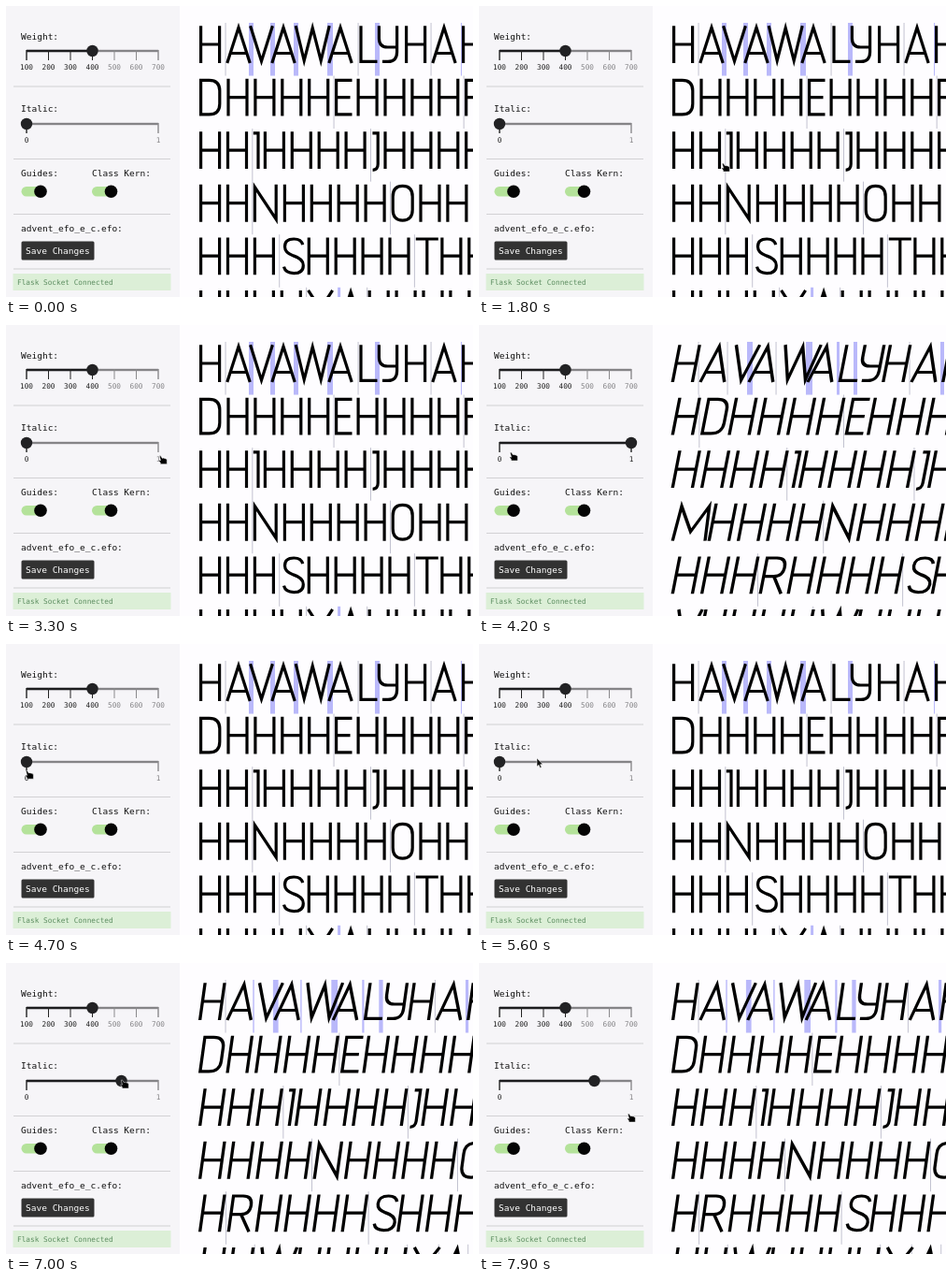
Animation, 500 px wide and 311 px high, one loop 8 s. Source, as an HTML page:

```html
<!DOCTYPE html>
<html lang="en">
<head>
<meta charset="utf-8">
<title>Kerning preview</title>
<style>
  html, body { margin: 0; width: 100%; height: 100%; overflow: hidden; background: #fefdff; }
  svg { display: block; width: 500px; height: 311px; }
  text { font: 9.53px "DejaVu Sans Mono", monospace; fill: #111; white-space: pre; }
  text.small { font-size: 7.75px; }
  .mid { text-anchor: middle; }
  .glyph { fill: none; stroke: #000; stroke-width: 3.2; stroke-miterlimit: 8; }
</style>
</head>
<body>
<svg id="stage" viewBox="0 0 500 311">
  <g id="guides"></g>
  <g id="glyphs"></g>
  <rect width="186" height="311" fill="#f6f5f8"/>
  <g id="panel"></g>
  <g id="cursor">
    <path id="hand" d="M-3.6 -4.6 Q-3 -5.6 -2 -4.4 L-.6 -2.2 Q.4 -3 1.4 -2.1 Q2.4 -2.6 3 -1.6 Q4.4 -1.8 4.4 -.2 V4 H-2.6 V2.6 L-4.2 .6 Q-4 -.4 -2.4 .2 Z" fill="#000" stroke="#fff" stroke-width=".5"/>
    <path id="arrow" d="M0 -4.5 V4.6 L2 2.8 L3.5 6 L5 5.3 L3.6 2.3 L6.2 2 Z" fill="#111" stroke="#fff" stroke-width=".5"/>
  </g>
</svg>
<script>
const LOOP = 8000, PITCH = 56.55, BASE = 61;
const $ = id => document.getElementById(id);

function add(parent, tag, attrs, text) {
  const el = document.createElementNS("http://www.w3.org/2000/svg", tag);
  for (const k in attrs) el.setAttribute(k, attrs[k]);
  if (text) el.textContent = text;
  parent.appendChild(el);
  return el;
}

// letter: [advance, outline on a baseline at 0]
const FONT = {
  H: [28.9, "M2.6 0V-39.8M22.6 0V-39.8M2.6 -20H22.6"],
  A: [31.5, "M1.8 0L14 -38L26.2 0M5.6 -10.5H22.4"],
  V: [28, "M1.6 -39.8L13.5 -2L25.4 -39.8"],
  W: [41, "M2.2 -39.8L11.2 -2.5L20.2 -37.5L29.2 -2.5L38.2 -39.8"],
  L: [24, "M3 -39.8V-1.6H20.5"],
  Y: [31, "M4.4 -39.8V-26.5Q4.4 -17 13.5 -17H23.6M23.6 -39.8V-12Q23.6 -1.6 14 -1.6H8"],
  D: [29.4, "M2.6 -1.6H11.5Q22.8 -1.6 22.8 -13V-27Q22.8 -38.2 11.5 -38.2H2.6Z"],
  E: [23.5, "M19.5 -1.6H2.6V-38.2H19.5M2.6 -20H17.5"],
  F: [23, "M2.6 0V-38.2H19.5M2.6 -20H17.5"],
  I: [11, "M1 -38.2H6.2V0"],
  J: [13, "M2 -38.2H7.8V-5Q7.8 1 2.2 1.2"],
  M: [39, "M2.6 0L5 -37L19 -10L33 -37L35.4 0"],
  N: [32, "M2.6 0V-37L25.4 -2.8V-39.8"],
  O: [30, "M2.8 -13V-27Q2.8 -38.2 13.2 -38.2Q23.8 -38.2 23.8 -27V-13Q23.8 -1.6 13.2 -1.6Q2.8 -1.6 2.8 -13Z"],
  R: [30, "M2.6 0V-38.2H12.5Q22 -38.2 22 -28.5Q22 -18.5 12.5 -18.5H2.6M13 -18.5L23.5 0"],
  S: [29, "M25 -32Q23.5 -38.2 15.5 -38.2Q5.8 -38.2 5.8 -30Q5.8 -23.5 15 -20.3Q25.6 -17 25.6 -10Q25.6 -1.6 15.5 -1.6Q6.5 -1.6 4.8 -8.5"],
  T: [27, "M1.5 -38.2H25.5M13.5 -38.2V0"],
  X: [33.5, "M2 -39.8L28 0M28 -39.8L2 0"]
};

// first line: glyph starts and the ends of the kerning bands, upright and fully italic
const KERN = "HAVAWALYHAH";
const STARTS = [[206, 235, 260, 283, 308, 344, 377, 395, 426, 455, 487],
                [204.5, 235, 266, 287, 318, 350, 383, 401, 430, 461, 494]];
const ENDS = [[0, 235, 265, 288, 313, 350, 377, 400, 0, 455, 488],
              [0, 235, 266, 293, 318, 357, 386, 405, 0, 461, 498]];

// italic value from a given moment, and how the text wraps there
const UP = ["DHHHHEHHHHF", "HHIHHHHJHHHH", "HHNHHHHOHHHH", "HHHSHHHHTHH", "HHHHXAHHHH"];
const STATES = [
  { at: 0, italic: 0, rows: UP },
  { at: 3400, italic: 1, rows: ["HDHHHHEHHHH", "HHHHIHHHHJHH", "MHHHHNHHHH", "HHHRHHHHSHH", "VHHHHWHHHH"] },
  { at: 4600, italic: 0, rows: UP },
  { at: 6000, italic: .362, rows: ["DHHHHEHHHHF", "HHIHHHHJHHHH", "HHNHHHHOHHHH", "HHHSHHHHTHHH", "WHHHHXAHHH"] },
  { at: 6900, italic: .72, rows: ["DHHHHEHHHHF", "HHHIHHHHJHHH", "HHHHNHHHHO", "HRHHHHSHHHH", "HHWHHHHXAH"] }
];

// cursor stops: time, x, y
const PATH = [[100, 386, 292], [900, 330, 235], [1500, 264, 173], [1900, 264, 173],
  [3200, 169, 145], [3450, 166, 144], [4200, 37, 141], [4600, 23, 141], [5300, 58, 127],
  [5600, 62, 126.5], [6000, 73, 128], [6200, 98, 128.5], [6900, 124, 127], [7500, 163, 166], [8000, 163, 166]];

const mix = (a, b, t) => a + (b - a) * t;
let italicSlider;

function guide(x, end, row) {
  const y = 18 + row * PITCH, wide = end - x > .9;
  add($("guides"), "rect", wide
    ? { x, y, width: end - x, height: PITCH, fill: "#b9b8fa" }
    : { x: x - .4, y, width: .9, height: PITCH, fill: "#bcbccb" });
}

function glyph(letter, x, row, t) {
  const slant = -Math.tan(11 * t * Math.PI / 180);
  add($("glyphs"), "path", {
    class: "glyph", d: FONT[letter][1],
    transform: `matrix(${1 + .06 * t} 0 ${slant} 1 ${x} ${BASE + row * PITCH})`
  });
}

function setText({ italic: t, rows }) {
  $("guides").replaceChildren();
  $("glyphs").replaceChildren();
  [...KERN].forEach((c, i) => {
    const x = mix(STARTS[0][i], STARTS[1][i], t);
    if (ENDS[0][i]) guide(x, mix(ENDS[0][i], ENDS[1][i], t), 0);
    glyph(c, x, 0, t);
  });
  rows.forEach((line, r) => {
    let x = 206 - 1.5 * t;
    [...line].forEach((c, i) => {
      if (x > 505) return;
      const afterA = line[i - 1] === "A";
      if (i && (c !== "H" || afterA)) guide(x, c === "A" ? x + 3 * (1 - t) : x, r + 1);
      glyph(c, x, r + 1, t);
      x += FONT[c][0] + (c === "H" ? 2.4 * t : c === "N" ? 2 * t : 0);
    });
  });
}

function slider(y, labels) {
  const g = $("panel"), step = 141 / (labels.length - 1);
  add(g, "rect", { x: 22, y: y - 1.2, width: 141, height: 2.4, fill: "#858487" });
  const fill = add(g, "rect", { x: 22, y: y - 1.2, height: 2.4, fill: "#1c1c1e" });
  const marks = labels.map((s, i) => {
    const x = 22 + i * step, edge = i === 0 || i === labels.length - 1;
    return [add(g, "rect", { x: x - (edge ? .7 : .5), y: y - 1, width: edge ? 1.4 : 1, height: 11 }),
            add(g, "text", { class: "small mid", x, y: y + 19.5 }, s)];
  });
  const thumb = add(g, "circle", { cy: y, r: 6.2, fill: "#222224" });
  return v => {
    fill.setAttribute("width", 141 * v);
    thumb.setAttribute("cx", 22 + 141 * v);
    marks.forEach(([tick, label], i) => {
      const on = i / (marks.length - 1) <= v + .001;
      tick.setAttribute("fill", on ? "#222" : "#8a898c");
      label.style.fill = on ? "#222" : "#858487";
    });
  };
}

function toggle(x) {
  add($("panel"), "rect", { x, y: 193, width: 26, height: 10.6, rx: 5.3, fill: "#b4e29a" });
  add($("panel"), "circle", { cx: x + 20.5, cy: 198.3, r: 6.8, fill: "#050505" });
}

function buildPanel() {
  const g = $("panel");
  [["Weight:", 16, 35.5], ["Italic:", 16, 113], ["Guides:", 16, 181.5],
   ["Class Kern:", 92, 181.5], ["advent_efo_e_c.efo:", 16, 240.5]]
    .forEach(([s, x, y]) => add(g, "text", { x, y }, s));
  [86, 163.5, 222.5, 281].forEach(y =>
    add(g, "rect", { x: 8, y: y - .5, width: 168, height: 1, fill: "#d2d1d4" }));
  slider(48, ["100", "200", "300", "400", "500", "600", "700"])(.5);
  italicSlider = slider(126, ["0", "1"]);
  toggle(16.5);
  toggle(92);
  add(g, "rect", { x: 16.5, y: 251.5, width: 78, height: 20, rx: 1.5, fill: "#323232" });
  add(g, "text", { x: 21, y: 265, style: "fill:#fff" }, "Save Changes");
  add(g, "rect", { x: 7.5, y: 286, width: 169, height: 18, fill: "#dcefd7" });
  add(g, "text", { class: "small", x: 12, y: 297.5, style: "fill:#5c8d60" }, "Flask Socket Connected");
}

function moveCursor(ms) {
  $("cursor").style.display = ms < PATH[0][0] ? "none" : "";
  const i = PATH.findIndex(p => p[0] > ms);
  if (i < 1) return;
  const [a, b] = [PATH[i - 1], PATH[i]];
  const k = (ms - a[0]) / (b[0] - a[0]), e = k * k * (3 - 2 * k);
  $("cursor").setAttribute("transform", `translate(${mix(a[1], b[1], e)} ${mix(a[2], b[2], e)})`);
  const arrow = ms > 4900 && ms < 5900;
  $("arrow").style.display = arrow ? "" : "none";
  $("hand").style.display = arrow ? "none" : "";
}

let shown;
function draw(ms) {
  const state = STATES.filter(s => s.at <= ms).pop();
  if (state !== shown) {
    shown = state;
    setText(state);
    italicSlider(state.italic);
  }
  moveCursor(ms);
}

buildPanel();
draw(0);
const begin = performance.now();
(function tick() {
  draw((performance.now() - begin) % LOOP);
  requestAnimationFrame(tick);
})();
</script>
</body>
</html>
```
